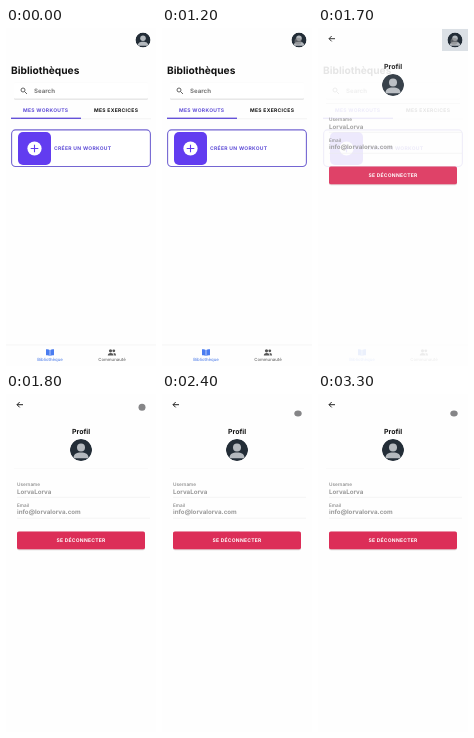
An HTML page for the animation above (3.4 s loop, 150 by 338 pixels).

```html
<!DOCTYPE html>
<html lang="fr">
<head>
<meta charset="utf-8">
<title>Profil</title>
<style>
  html, body { margin: 0; width: 100%; height: 100%; overflow: hidden; background: #fefefe; }
  svg { display: block; width: 100vw; height: 100vh; }
  text { font-family: Inter, "Open Sans", sans-serif; font-weight: 700; fill: #111; text-rendering: geometricPrecision; }
  .caps { font-size: 5px; letter-spacing: .3px; }
  .mid { text-anchor: middle; }
  .purple { fill: #5e4cd6; }
  .label { font-size: 4.7px; font-weight: 500; fill: #858585; }
  .value { font-size: 6.2px; font-weight: 700; fill: #989898; }
  .nav { font-size: 4.3px; font-weight: 500; text-anchor: middle; }
  .rule { stroke: #ececec; stroke-width: .6; }
</style>
</head>
<body>
<svg viewBox="0 0 150 338">
  <defs>
    <filter id="shadow" x="-10%" y="-30%" width="120%" height="180%">
      <feDropShadow dx="0" dy=".7" stdDeviation=".7" flood-opacity=".25"/>
    </filter>
    <clipPath id="disc"><circle r="11"/></clipPath>
    <g id="avatar" clip-path="url(#disc)">
      <circle r="11" fill="#232d37"/>
      <circle cy="-2.6" r="4" fill="#b4b9be"/>
      <path d="M-7.5 8.3C-7.5 4-4.5 2.6 0 2.6S7.5 4 7.5 8.3Z" fill="#b4b9be"/>
    </g>
  </defs>
  <rect width="150" height="338" fill="#fefefe"/>

  <g id="home">
    <use href="#avatar" transform="translate(137 12) scale(.69)"/>
    <text x="5" y="45.8" font-size="10.2">Bibliothèques</text>
    <rect x="8" y="54.5" width="134" height="16" rx="1" fill="#fff" filter="url(#shadow)"/>
    <g fill="none" stroke="#555" stroke-width=".9">
      <circle cx="17" cy="62" r="2"/>
      <path d="M18.5 63.5L21 66"/>
    </g>
    <text x="28" y="65" font-size="6.1" style="fill:#777">Search</text>
    <text class="caps purple" x="17" y="84.2">MES WORKOUTS</text>
    <text class="caps" x="88" y="84.2">MES EXERCICES</text>
    <path class="rule" d="M5 90.7H145"/>
    <rect x="5" y="89.6" width="70" height="1.4" fill="#6552d8"/>
    <rect x="5.6" y="101.9" width="138.8" height="36.6" rx="4" fill="#fff" stroke="#7466d2" stroke-width="1.1"/>
    <rect x="12" y="104" width="33" height="33" rx="5" fill="#623cf0"/>
    <circle cx="28.5" cy="120.5" r="7.1" fill="#fff"/>
    <path d="M24.7 120.5h7.6M28.5 116.7v7.6" stroke="#623cf0" stroke-width="1.1"/>
    <text class="caps purple" x="48" y="122.4">CRÉER UN WORKOUT</text>
    <path class="rule" d="M0 317H150"/>
    <path d="M40 321.3q2.3-.5 3.7.6v6q-1.4-1-3.7-.6zM48 321.3q-2.3-.5-3.7.6v6q1.4-1 3.7-.6z" fill="#4a7cf0"/>
    <g fill="#555">
      <circle cx="104.5" cy="322.8" r="1.6"/>
      <circle cx="107.8" cy="322.8" r="1.4"/>
      <path d="M101.8 327.5q0-2.5 2.9-2.5t2.9 2.5zM108.2 327.5q0-1.5-.8-2.4 2.7-.2 2.7 2.4z"/>
    </g>
    <text class="nav" x="44" y="333.3" style="fill:#5b86ea">Bibliothèque</text>
    <text class="nav" x="106" y="333.3" style="fill:#6a6a6a">Communauté</text>
  </g>

  <g id="profile">
    <path d="M17 10.7H11M13.7 8L11 10.7L13.7 13.4" fill="none" stroke="#222" stroke-width="1"/>
    <g id="details">
      <text class="mid" x="75" y="39.7" font-size="7">Profil</text>
      <use href="#avatar" transform="translate(75 56)"/>
      <path class="rule" d="M8 74.5H142" opacity=".4"/>
      <text class="label" x="11" y="91.7">Username</text>
      <text class="value" x="11" y="99.5">LorvaLorva</text>
      <path class="rule" d="M11 103.3H144"/>
      <text class="label" x="11" y="112.7">Email</text>
      <text class="value" x="11" y="120.3">info@lorvalorva.com</text>
      <path class="rule" d="M11 124.2H144"/>
      <rect x="11" y="137.5" width="128" height="17.7" rx="1.8" fill="#dc2f59" filter="url(#shadow)"/>
      <text class="caps mid" x="75" y="148.2" style="fill:#fff;letter-spacing:.25px">SE DÉCONNECTER</text>
    </g>
  </g>

  <g id="pressed">
    <rect x="124" y="1" width="26" height="22" fill="#dbe0e5"/>
    <use href="#avatar" transform="translate(137 12) scale(.69)"/>
  </g>
  <ellipse id="touch" fill="#858587"/>
</svg>
<script>
  const DURATION = 3400, STEP = 100, OPEN = 1700;
  const el = id => document.getElementById(id);
  const clamp = v => Math.max(0, Math.min(1, v));
  const progress = (t, from, to) => clamp((t - from) / (to - from));
  const mix = (a, b, p) => a + (b - a) * p;

  function render(time) {
    const t = Math.floor(time % DURATION / STEP) * STEP;
    const opened = t >= OPEN;
    const settle = progress(t, OPEN, OPEN + STEP);

    el('home').setAttribute('opacity', opened ? .1 * (1 - settle) : 1);
    el('profile').setAttribute('opacity', opened ? mix(.9, 1, settle) : 0);
    el('details').setAttribute('transform', `translate(0 ${1 - settle})`);
    el('pressed').setAttribute('opacity', opened ? 1 - settle : 0);

    const drop = progress(t, 2100, 2300);
    const touch = el('touch');
    touch.setAttribute('cx', 136);
    touch.setAttribute('cy', mix(13.3, 19.4, drop));
    touch.setAttribute('rx', mix(3.5, 3.7, drop));
    touch.setAttribute('ry', mix(3.5, 3, drop));
    touch.setAttribute('opacity', opened ? mix(.6, 1, settle) : .6 * progress(t, 600, 1100));
  }

  const start = performance.now();
  (function tick() {
    render(performance.now() - start);
    requestAnimationFrame(tick);
  })();
</script>
</body>
</html>
```
